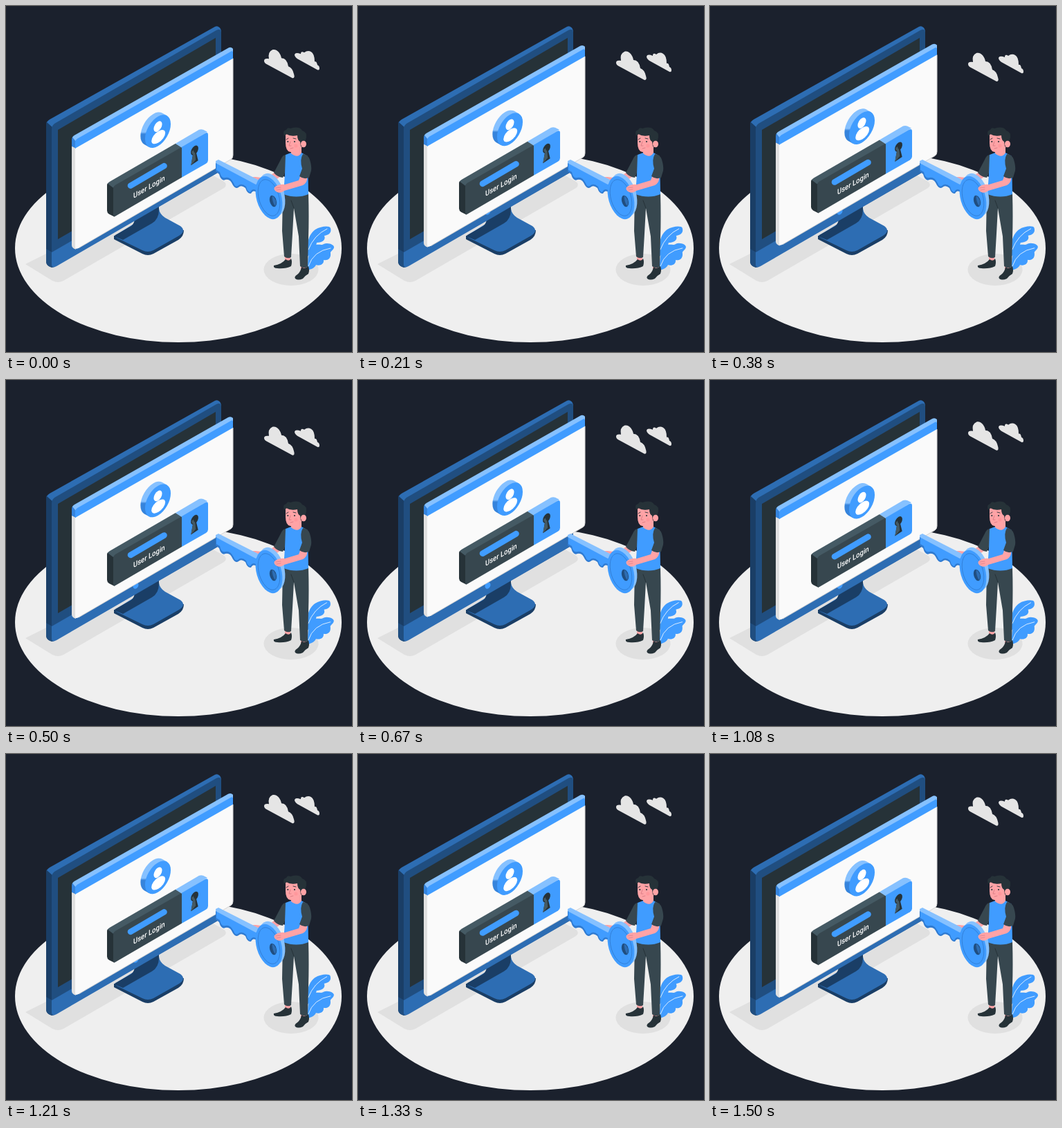
An HTML page for the animation above (1.54 s loop, 500x500 px).

```html
<!DOCTYPE html>
<html lang="en">
<head>
<meta charset="utf-8">
<title>User login</title>
<style>
  html, body { margin: 0; height: 100%; overflow: hidden; background: #1b212d; }
  svg { display: block; width: 100%; height: 100%; }
  .blue { fill: #409cff; }
  .light { fill: #86c1ff; }
  .deep { fill: #2d6db3; }
  .dusk { fill: #204e80; }
  .navy { fill: #1a3e66; }
  .slate { fill: #37474f; }
  .ink { fill: #263238; }
  .skin { fill: #ffa3a6; }
  .shade { fill: #e0e0e0; }
  .line { fill: none; stroke-linecap: round; stroke-linejoin: round; }
</style>
</head>
<body>
<svg viewBox="0 0 500 500">
  <defs>
    <linearGradient id="rim" gradientUnits="userSpaceOnUse" x2="-4" y2="8">
      <stop offset=".1" stop-color="#86c1ff"/>
      <stop offset=".4" stop-color="#3684dc"/>
    </linearGradient>
  </defs>

  <ellipse cx="249" cy="350" rx="236" ry="136" fill="#efefef"/>
  <path class="shade" d="M28 373 67 397Q75 401 83 397L315 263Q321 258 314 253L290 240 60 357Z"/>
  <ellipse class="shade" cx="412" cy="381" rx="39.5" ry="23"/>

  <g id="stand">
    <path class="navy" d="M156 332V337L197 358Q205 362 213 358L249 338Q257 333 257 324Z"/>
    <path class="deep" d="M157 332 186 314 221 288V293Q222 301 230 306L252 318Q261 325 250 332L213 353Q205 357 197 353L160 335Z"/>
    <path class="navy" d="M158 331 181 318Q186 314 186 306V298L221 286V294Q221 308 211 314L169 338 159 334Q156 333 158 331Z"/>
  </g>

  <g id="monitor">
    <path class="navy" d="M58 170Q58 166 62 167L70 172V377Q66 379 62 376 58 374 58 369Z"/>
    <path class="dusk" d="M58 351 67 356V378Q58 376 58 369Z"/>
    <path class="deep" d="M59 168Q60 166 63 164L300 31Q304 28 307 30 311 32 311 38L68 176Z"/>
    <path class="dusk" d="M66 178Q66 173 70 170L304 35Q311 32 311 39V238L73 375Q66 379 66 372Z"/>
    <path class="ink" d="M75 179 303 46V205L75 337Z"/>
    <path class="deep" d="M66 356 311 215V238L73 376Q66 380 66 373Z"/>
    <ellipse class="blue" cx="187.5" cy="297" rx="3.8" ry="5" transform="rotate(25 187.5 297)"/>
  </g>

  <g id="panel">
    <path class="shade" d="M95 200 101 203V352Q95 350 95 346Z"/>
    <path fill="#fafafa" d="M100 203 328 73V216Q328 220 325 222L105 350Q100 353 100 348Z"/>
    <path fill="none" stroke="#d5d5d5" d="M328 76V216Q328 220 325 222L105 350"/>
    <path fill="#3684dc" d="M95 193Q95 190 97 189L101 193V206L95 203Z"/>
    <path class="light" d="M96 190Q97 188 99 187L321 61Q325 59 328 62V67L101 196Z"/>
    <path class="blue" d="M100 197Q100 194 103 192L325 66Q328 64 328 68V76L100 206Z"/>

    <g transform="matrix(.866 -.5 0 1 219.5 181.5)">
      <path fill="url(#rim)" d="M15.1-15.100-15.100 15.100-23.200 7.100A21.400 21.400 0 0 1 7-23.200Z"/>
      <circle class="blue" r="21.4"/>
      <g fill="#fff"><circle cy="-7" r="7"/><ellipse cx=".8" cy="8.500" rx="11.500" ry="8.300"/></g>
    </g>

    <path class="ink" d="M146 259Q146 256 149 256L157 261V305L149 301Q146 299 146 296Z"/>
    <path fill="#455a64" d="M147 257Q147 256 150 254L245 199 255 205 155 263Z"/>
    <path class="slate" d="M155 264Q155 261 158 259L254 204V248L158 304Q155 305 155 302Z"/>
    <path class="light" d="M245 199 279 179Q282 178 285 179L291 182 254 205Z"/>
    <path class="blue" d="M254 204 288 184Q292 182 292 186V223Q292 226 289 228L254 248Z"/>
    <path class="line" stroke="#409cff" stroke-width="8.6" d="M180 260 228.5 231.5"/>
    <text transform="matrix(.866 -.5 0 1 184 278.5)" fill="#fff" font-family="Roboto, sans-serif" font-size="11" font-weight="500">User Login</text>
    <g transform="matrix(.866 -.5 0 1 272.5 209.5)">
      <path class="ink" d="M-3 5A6.300 6.300 0 1 1 3 5L6 17-6 18Z"/>
      <path fill="#455a64" d="M-2 5Q-5 2-5-1L-2-2Q-1 2 1 4L2 14-6 18-3 5Z"/>
    </g>
  </g>

  <g id="clouds" fill="#e5e5e5">
    <path d="M373 79Q373 75 380 76 378 66 385 63C391 61 397 68 398 75Q406 75 408 87 414 89 416 98 418 104 414 104L377 84Q373 82 373 79Z"/>
    <path d="M417 70Q418 66 426 69 426 64 431 67 436 63 441 66 446 69 446 80 449 79 450 85 453 86 453 90 453 93 450 92L421 76Q417 73 417 70Z"/>
  </g>

  <g id="plant">
    <path class="blue" d="M436 362C434 340 438 330 447 323 455 318 468 317 469 321 471 328 466 331 460 332 463 339 455 342 449 342 448 350 442 356 436 362Z"/>
    <path class="blue" d="M436 382C436 365 437 354 444 348 449 342 456 347 459 344 465 341 475 345 474 349 473 353 468 355 469 357 470 366 464 368 459 367 460 374 452 376 448 374 446 379 441 380 436 382Z"/>
    <path class="line" stroke="#fff" stroke-width=".8" d="M437 352Q445 331 464 322M437 376Q444 354 469 350"/>
  </g>

  <g id="man">
    <path class="skin" d="M403 360H411V371H403ZM426 374H434V383H426Z"/>
    <path class="ink" d="M404 366Q409 370 412 365 414 370 412 376 404 380 392 379 386 379 387 375 399 373 404 366ZM427 377Q431 381 437 376 439 382 437 387 433 389 429 394 422 397 418 394 416 391 421 388 426 384 427 377Z"/>
    <path class="slate" d="M400 271H437Q438 305 437 335L436 377Q430 380 425 376L423 333 416 292 414 329 412 363Q407 366 402 362L399 325Z"/>
    <path class="line" stroke="#263238" d="M416 292 412 281"/>
    <path class="skin" d="M391 238 402 243 381 257 357 254Q351 250 353 247L361 247 377 249Z"/>
    <path class="slate" d="M404 215Q400 215 397 222L387 241Q392 247 400 248L407 232Z"/>
    <path class="blue" d="M404 215 412 212Q420 217 427 212L436 217 437 272Q420 279 401 272L403 243Z"/>
    <path class="skin" d="M412 204H427V212Q422 221 412 213Z"/>
    <path class="skin" d="M404 186Q414 180 428 184L428 203Q423 212 411 211 404 210 404 198Z"/>
    <path class="ink" d="M402 188Q399 180 405 179 406 175 411 177 424 173 428 180 435 182 434 190L430 204 426 203 425 196Q421 194 421 187 411 189 405 185Z"/>
    <ellipse class="skin" cx="430" cy="199.5" rx="4" ry="4.8"/>
    <g class="ink"><circle cx="407.3" cy="196" r="1.1"/><circle cx="417" cy="196" r="1.1"/></g>
    <path class="line" stroke="#263238" stroke-width=".9" d="M405 193 408 191M415 191 419 192"/>
    <path class="line" stroke="#d87b84" stroke-width=".9" d="M411 196 409 202 412 202M411 206 415 205"/>
    <circle cx="419" cy="202" r="2.5" fill="#ff8b91" opacity=".5"/>
  </g>

  <g id="key">
    <path fill="#2f7bd2" d="M303 226 362 256V269Q357 265 354 271 349 272 346 263 340 258 336 262 332 265 328 259 324 249 317 251 311 254 308 243L303 239Z"/>
    <path class="blue" d="M304 227 365 256 363 267Q356 262 353 269 349 269 347 261 340 255 335 260 331 262 329 256 324 246 317 248 311 250 309 240L304 237Z"/>
    <path class="light" d="M303 227V224L307 222 368 253 361 258Z"/>
    <ellipse class="light" cx="384" cy="273" rx="18" ry="32" transform="rotate(-16 384 273)"/>
    <g transform="translate(380 277) rotate(-16)">
      <ellipse class="blue" rx="18" ry="32"/>
      <ellipse rx="14.5" ry="27" fill="none" stroke="#2f7bd2" stroke-width=".8"/>
    </g>
    <g transform="rotate(-16 386 282)">
      <ellipse class="dusk" cx="386" cy="282" rx="4.8" ry="8.5"/>
      <path class="deep" d="M387 274Q393 282 387 290 384 282 387 274Z"/>
    </g>
  </g>

  <g id="arm">
    <path class="skin" d="M426 244 435 247Q436 255 429 259L402 267Q397 271 392 269 386 266 388 262 394 257 403 258L423 252Z"/>
    <path class="line" stroke="#d87b84" stroke-width=".7" d="M390 263 397 262M391 266 397 265"/>
    <path class="slate" d="M429 214Q436 214 439 222 442 232 441 238L438 248Q430 251 424 246L428 235Q424 222 429 214Z"/>
  </g>
</svg>
<script>
  const LOOP = 1540;
  const part = id => document.getElementById(id);
  const start = performance.now();

  // Linear swing from 1 at the peak to -1 half a loop away.
  function swing(t, peak) {
    const phase = ((t - peak) / LOOP + 2) % 1;
    return 4 * Math.abs(phase - 0.5) - 1;
  }

  function draw() {
    const t = (performance.now() - start) % LOOP;
    const lift = 4.7 + 5.15 * swing(t, 710);
    const drift = 0.9 + 4.75 * swing(t, 435);
    const sway = -0.4 * (1 + swing(t, 770));
    part('panel').setAttribute('transform', `translate(0 ${-lift})`);
    part('clouds').setAttribute('transform', `translate(0 ${drift})`);
    part('plant').setAttribute('transform', `rotate(${sway} 437 382)`);
    requestAnimationFrame(draw);
  }
  draw();
</script>
</body>
</html>
```
